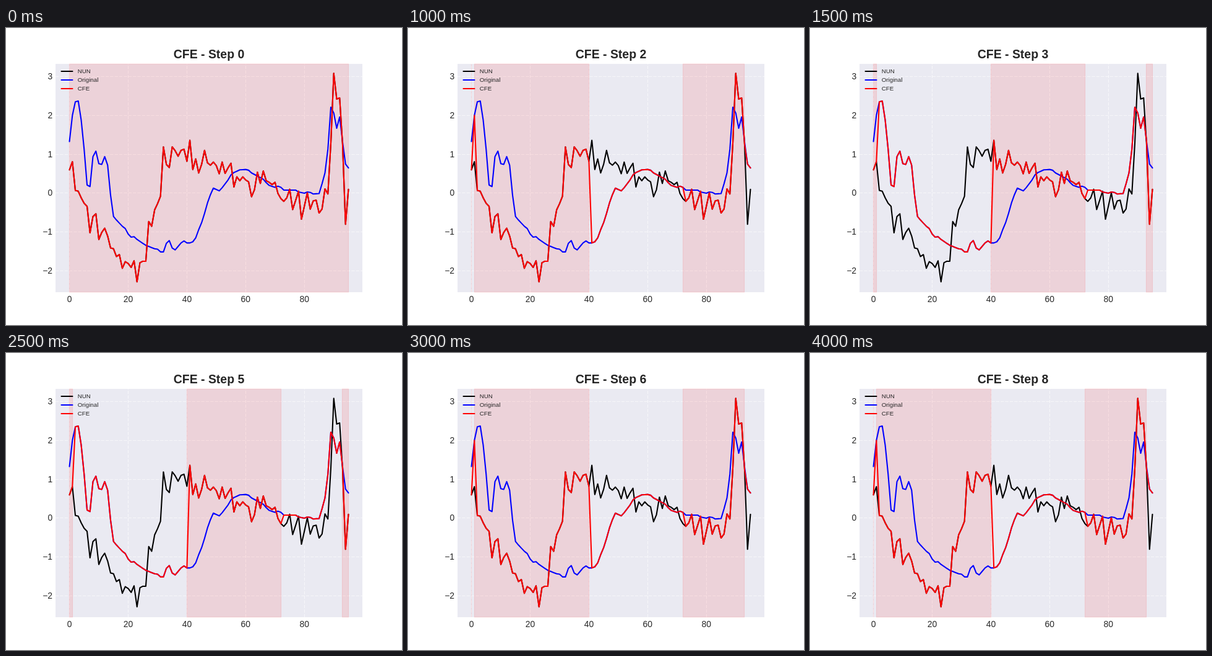
An HTML page for the animation above (4500 ms loop, 640 by 480 pixels).

```html
<!DOCTYPE html>
<html lang="en">
<head>
<meta charset="utf-8">
<title>CFE steps</title>
<style>
  html, body { margin: 0; width: 100%; height: 100%; overflow: hidden; background: #fff; }
  svg { display: block; width: 640px; height: 480px; }
  text { font-family: "Liberation Sans", Arial, sans-serif; font-size: 13.89px; fill: #262626; }
  .title { font-size: 19.44px; font-weight: bold; text-anchor: middle; }
  .legend { font-size: 9.72px; }
  .grid { stroke: #fff; stroke-opacity: .6; stroke-dasharray: 5.14 2.22; }
  .line { fill: none; stroke-width: 2.08; stroke-linecap: round; stroke-linejoin: round; }
  .band { fill: #f00; fill-opacity: .1; stroke: #f00; stroke-opacity: .1; stroke-width: 1.2; }
</style>
</head>
<body>
<svg id="chart" viewBox="0 0 640 480"></svg>
<script>
const STEP_MS = 500, STEPS = 9, LAST = 95;
const AXES = { x: 80, y: 58, width: 496, height: 369 };

// Series values in hundredths; gaps are filled linearly.
const neighbour = [
  60, 81, 7, 5, -12, -26, -34, -102, -60, -53, -119, -101, -90, -110, -141, -143,
  -163, -158, -193, -176, -181, -191, -174, -228, -179, -175, -175, -73, -85, -43, -27, -8,
  119, 74, 66, 119, 109, 95, 110, 113, 82, 136, 61, 88, 52, 74, 110, 78,
  72, 80, 71, 50, 80, 51, 65, 77, 16, 42, 32, 42, 34, 29, -9, 9,
  54, 25, 57, 32, 28, 22, 28, -1, -14, -21, -12, 10, -42, -19, 5, -67,
  -33, 1, -41, -20, -18, -51, -41, 11, -2, 128, 308, 242, 245, 125, -80, 10];
const base = fillGaps([
  133, 200, 235, 237, 188, 113, 21, 17, 94, 108, 76, 74, 94, 72, -5, -60,
  -69, , -85, -91, -105, -113, -112, -119, , , -134, , , -143, -144, -151,
  -151, -129, -122, -141, -146, , -128, -123, -128, -128, -125, -115, -94, -76, -52, -25,
  -4, 13, , 6, 14, , 34, 47, 53, , 60, , 61, 59, 52, ,
  , , 36, 27, 20, , 15, 18, 15, 8, , , , 8, 3, ,
  0, 3, 2, -2, , -1, 24, 52, 113, 221, 206, 167, 196, 132, 75, 65]);

// Inclusive index ranges taken from the neighbour series.
const ALL = [[0, 95]];
const TWO = [[0, 1], [41, 95]];
const OUTER = [[0, 1], [41, 72], [94, 95]];
const INNER = [[0, 0], [2, 40], [73, 93]];
const masks = [ALL, TWO, INNER, OUTER, INNER, OUTER, INNER, OUTER, INNER];

const chart = document.getElementById("chart");
const px = i => 102.55 + i * 4.7464;
const py = v => 266.95 - v * 0.6284;
const snap = v => Math.floor(v) + 0.5;

function fillGaps(sparse) {
  const out = Array.from(sparse);
  let prev = 0;
  sparse.forEach((value, i) => {
    for (let k = prev + 1; k < i; k++)
      out[k] = sparse[prev] + (value - sparse[prev]) * (k - prev) / (i - prev);
    prev = i;
  });
  return out;
}

function add(tag, attrs, text = "", parent = chart) {
  const node = document.createElementNS("http://www.w3.org/2000/svg", tag);
  for (const key in attrs) node.setAttribute(key, attrs[key]);
  node.textContent = text;
  return parent.appendChild(node);
}

const points = values =>
  values.map((v, i) => `${px(i).toFixed(2)},${py(v).toFixed(2)}`).join(" ");
const addLine = (values, stroke) =>
  add("polyline", { class: "line", stroke, points: points(values) });

add("rect", { ...AXES, fill: "#eaeaf2" });
const right = AXES.x + AXES.width, bottom = AXES.y + AXES.height;
for (let i = 0; i <= 80; i += 20) {
  const x = snap(px(i));
  add("line", { class: "grid", x1: x, x2: x, y1: bottom, y2: AXES.y });
  add("text", { x: px(i), y: 443, "text-anchor": "middle" }, i);
}
for (let v = -2; v <= 3; v++) {
  const y = snap(py(v * 100));
  add("line", { class: "grid", x1: AXES.x, x2: right, y1: y, y2: y });
  add("text", { x: 75.1, y: y + 4.8, "text-anchor": "end" }, String(v).replace("-", "\u2212"));
}

const bands = add("g", {});
addLine(neighbour, "#000");
addLine(base, "#00f");
const mixedLine = addLine(neighbour, "#f00");

[["NUN", "#000"], ["Original", "#00f"], ["CFE", "#f00"]].forEach(([label, stroke], row) => {
  const y = 70 + row * 14;
  add("line", { class: "line", stroke, x1: 89.5, x2: 107.5, y1: y, y2: y });
  add("text", { class: "legend", x: 115.8, y: y + 3.2 }, label);
});
const title = add("text", { class: "title", x: 328, y: 49 });

function show(step) {
  const mask = masks[step];
  const mixed = base.map((v, i) => mask.some(([a, b]) => i >= a && i <= b) ? neighbour[i] : v);
  title.textContent = `CFE - Step ${step}`;
  mixedLine.setAttribute("points", points(mixed));
  bands.replaceChildren();
  for (const [a, b] of mask) {
    const x1 = snap(px(Math.max(0, a - 1))), x2 = snap(px(Math.min(LAST, b)));
    add("path", { class: "band", d: `M${x1} ${bottom}V${AXES.y}H${x2}V${bottom}Z` }, "", bands);
  }
}

let shown = -1;
const start = performance.now();
function tick() {
  const step = Math.floor((performance.now() - start) / STEP_MS) % STEPS;
  if (step !== shown) show(shown = step);
  requestAnimationFrame(tick);
}
tick();
</script>
</body>
</html>
```
